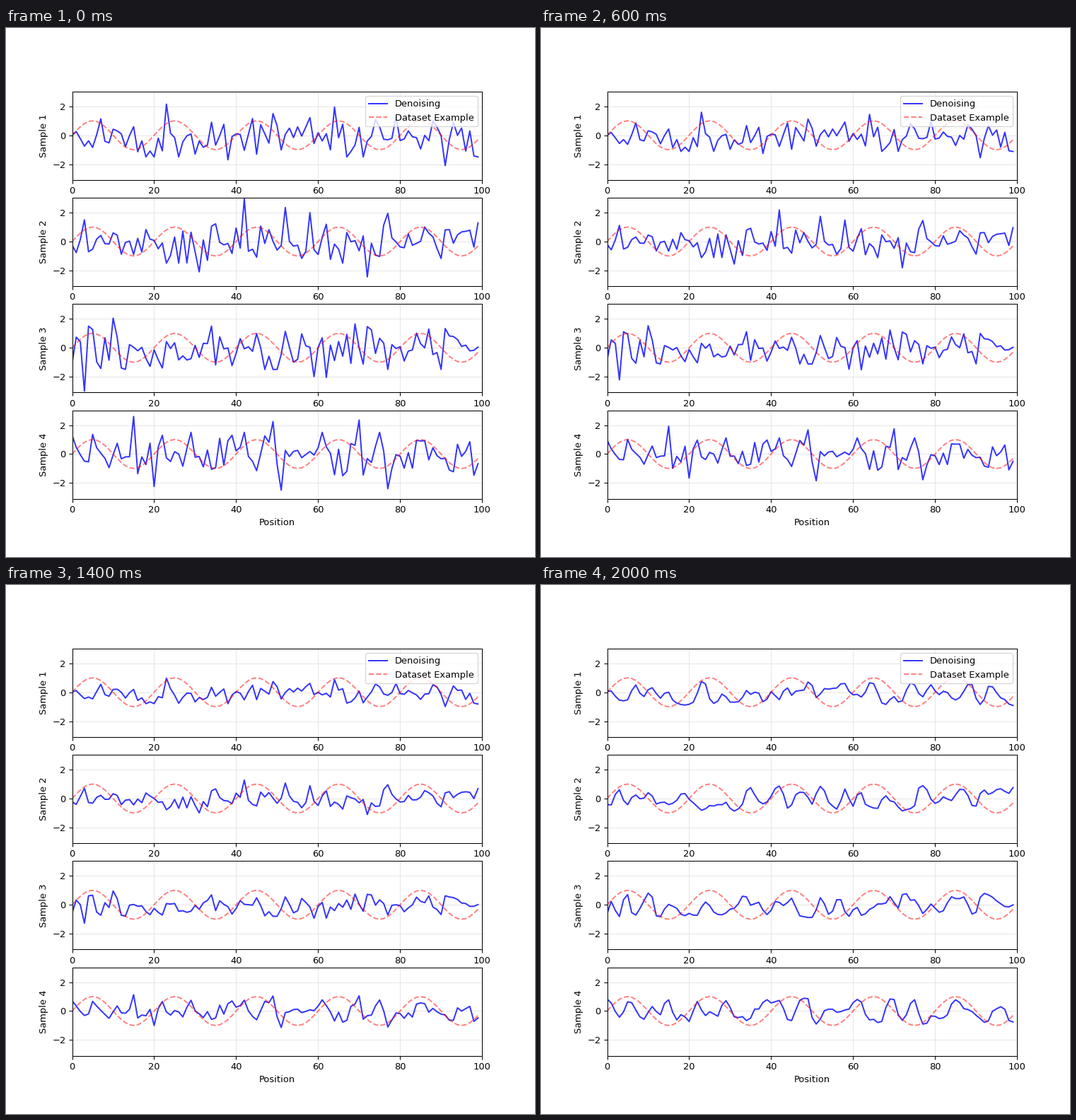
A matplotlib script for the animation above (2.2 s loop, 748 by 748 pixels).

```python
import numpy as np
import matplotlib.pyplot as plt
from matplotlib.animation import FuncAnimation

SIZE, INCHES = 748, 8
STEPS, INTERVAL = 11, 200
N = 100

# The tallest swings of each sample (position: value); the rest is seeded noise.
PEAKS = [
    {23: 2.15, 38: -1.7, 64: 1.95, 67: -1.5, 91: -2.1},
    {31: -2.1, 42: 2.95, 52: 2.35, 58: 2.0, 72: -2.45, 77: 1.95},
    {3: -3.0, 10: 2.05, 59: -2.0, 62: -2.05, 69: 1.65},
    {15: 2.6, 20: -2.25, 49: 2.25, 51: -2.5, 70: 2.35, 77: -2.4},
]

rng = np.random.default_rng(7)


def make_noise(peaks):
    noise = np.clip(rng.normal(0, 0.85, N), -1.5, 1.5)
    noise[list(peaks)] = list(peaks.values())
    return noise


def make_clean(noise):
    padded = np.pad(noise, 1, mode="edge")
    return 0.97 * np.tanh(1.2 * np.convolve(padded, [0.25, 0.5, 0.25], "valid"))


def denoise(noise, clean, u):
    keep = 1 - u + 0.04 * np.sin(np.pi * u)
    return keep * noise + u**3 * clean


noises = [make_noise(p) for p in PEAKS]
cleans = [make_clean(n) for n in noises]
x = np.arange(N)
wave = np.sin(2 * np.pi * x / 20)

fig, axes = plt.subplots(len(PEAKS), 1, figsize=(INCHES, INCHES), dpi=SIZE / INCHES)
lines = []
for i, ax in enumerate(axes):
    line, = ax.plot(x, noises[i], "b-", alpha=0.8, label="Denoising")
    ax.plot(x, wave, "r--", alpha=0.5, label="Dataset Example")
    ax.set_xlim(0, 100)
    ax.set_ylim(-3.1, 3.03)
    ax.set_ylabel(f"Sample {i + 1}")
    ax.grid(True, alpha=0.3)
    lines.append(line)
axes[0].legend(loc="upper right")
axes[-1].set_xlabel("Position")


def update(step):
    u = step / (STEPS - 1)
    for line, noise, clean in zip(lines, noises, cleans):
        line.set_ydata(denoise(noise, clean, u))
    return lines


anim = FuncAnimation(fig, update, frames=STEPS, interval=INTERVAL,
                     repeat=True, repeat_delay=0)
plt.show()
```
